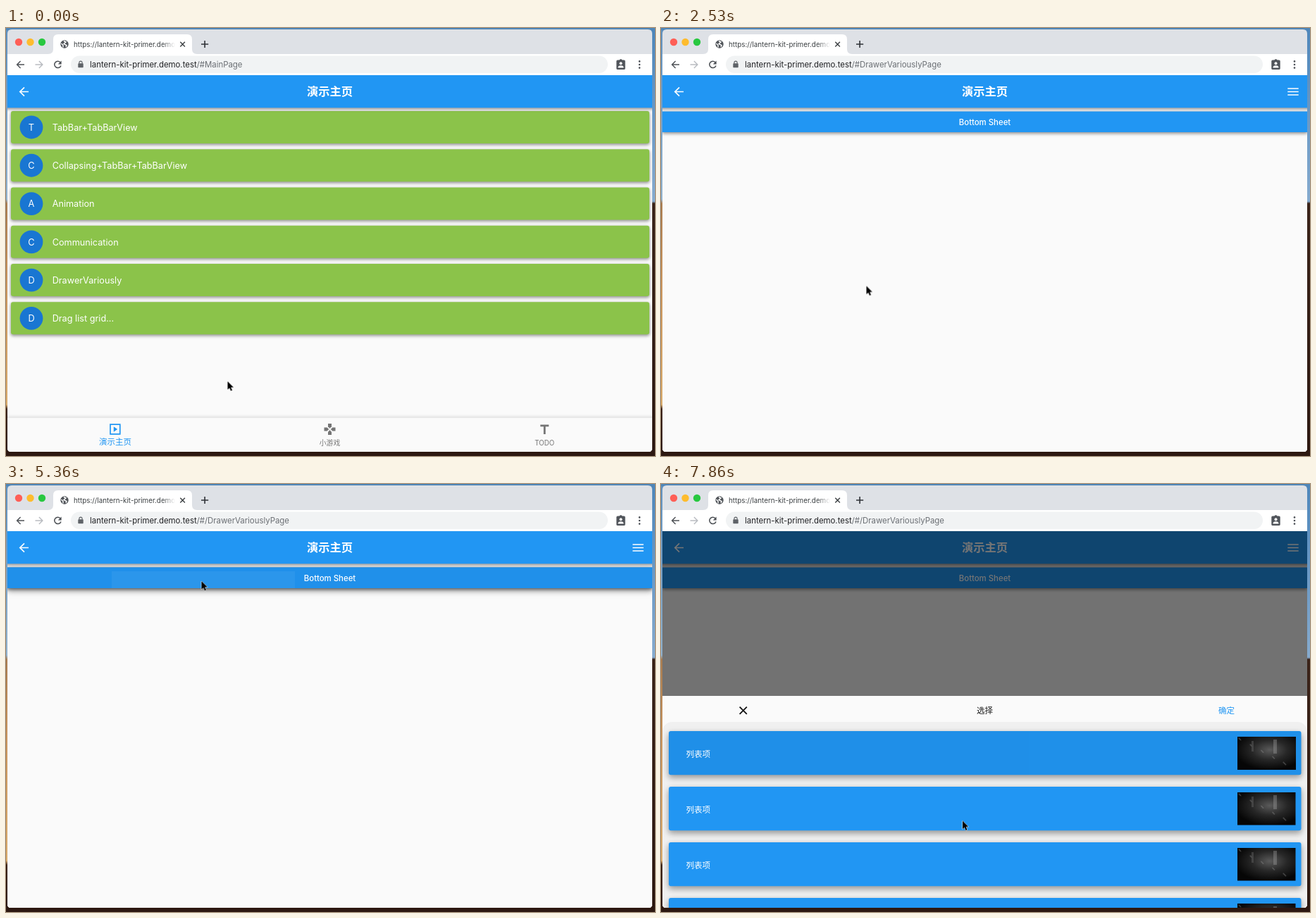
An HTML page for the animation above (8 s loop, 921 by 608 pixels).

```html
<!DOCTYPE html>
<html lang="zh-CN">
<head>
<meta charset="utf-8">
<title>Demo</title>
<style>
  html, body { margin: 0; width: 100%; height: 100%; overflow: hidden; }
  svg { display: block; width: 921px; height: 608px; }
  text { font-family: Inter, 'Noto Sans CJK SC', 'Noto Sans CJK', sans-serif; white-space: pre; }
  .mid { text-anchor: middle; }
  .line { fill: none; stroke-width: 1.6; }
  .bar { filter: drop-shadow(0 2.5px 2.3px rgba(0,0,0,.42)); }
  .card { filter: drop-shadow(0 2.5px 2px rgba(0,0,0,.33)) drop-shadow(0 1px 2px rgba(0,0,0,.14)); }
  .tile { filter: drop-shadow(0 4px 4px rgba(0,0,0,.3)) drop-shadow(0 2px 5px rgba(0,0,0,.1)); }
  .nav { filter: drop-shadow(0 -2.5px 1.5px rgba(0,0,0,.08)); }
</style>
</head>
<body>
<svg viewBox="0 0 921 608">
  <defs>
    <linearGradient id="leftEdge" x2="0" y2="1">
      <stop offset="0" stop-color="#5d8fbe"/><stop offset=".4" stop-color="#8fb0cc"/>
      <stop offset=".41" stop-color="#a97a4c"/><stop offset=".6" stop-color="#c9935a"/>
      <stop offset=".88" stop-color="#d8a968"/><stop offset=".89" stop-color="#3a2117"/>
      <stop offset="1" stop-color="#2a1711"/>
    </linearGradient>
    <linearGradient id="rightEdge" x2="0" y2="1">
      <stop offset="0" stop-color="#4d86bb"/><stop offset=".405" stop-color="#86abcf"/>
      <stop offset=".41" stop-color="#3a2319"/><stop offset="1" stop-color="#2b1710"/>
    </linearGradient>
    <linearGradient id="fade"><stop stop-color="#fff" stop-opacity="0"/><stop offset="1" stop-color="#fff"/></linearGradient>
    <radialGradient id="rain" cx=".55" cy=".4" r=".6">
      <stop stop-color="#5a5a5a"/><stop offset=".5" stop-color="#272727"/><stop offset="1" stop-color="#060606"/>
    </radialGradient>
    <clipPath id="app"><path d="M2 67H917V597Q917 602 912 602H7Q2 602 2 597Z"/></clipPath>
    <clipPath id="photo"><rect x="818" y="58" width="82.5" height="46.5"/></clipPath>
  </defs>

  <rect width="460" height="608" fill="url(#leftEdge)"/>
  <rect x="460" width="461" height="608" fill="url(#rightEdge)"/>
  <rect y="601" width="921" height="7" fill="#2d1811"/>
  <rect width="921" height="3" fill="#4f86b8"/>

  <g id="chrome">
    <path d="M2 37V8Q2 2 8 2H911Q917 2 917 8V37Z" fill="#dee1e6"/>
    <path d="M60 37Q67 37 67 30V16Q67 9 74 9H257Q264 9 264 16V30Q264 37 271 37H917V67.5H2V37Z" fill="#fff"/>
    <circle cx="18" cy="20" r="5.2" fill="#ff5f57"/>
    <circle cx="34.5" cy="20" r="5.2" fill="#febc2e"/>
    <circle cx="51" cy="20" r="5.2" fill="#28c840"/>
    <circle cx="83" cy="23" r="5.7" fill="#505459"/>
    <path d="M78.5 22L81 24.5V27.5M82 18.5L85 20L82 22.5L86 24.5L85 27" class="line" stroke="#fff" style="stroke-width:1.4"/>
    <text x="96" y="26.5" font-size="9.84" fill="#3c4043">https://lantern-kit-primer.demo</text>
    <rect x="222" y="14" width="18" height="18" fill="url(#fade)"/>
    <rect x="240" y="14" width="7" height="18" fill="#fff"/>
    <path d="M247.3 19.8L253.9 26.4M253.9 19.8L247.3 26.4" class="line" stroke="#3c4043" style="stroke-width:1.4"/>
    <path d="M277 23H287.2M282.1 18V28" class="line" stroke="#2f3237"/>
    <rect x="92" y="39.5" width="762" height="24.5" rx="12.2" fill="#f1f3f4"/>
    <path d="M26 52H15.8M20.6 47L15.6 52L20.6 57" class="line" stroke="#4d5156" style="stroke-width:1.4"/>
    <path d="M41.5 52H51.7M46.9 47L51.9 52L46.9 57" class="line" stroke="#b9bcc1" style="stroke-width:1.4"/>
    <path d="M77 48.7A4.7 4.7 0 1 0 78 53.4" class="line" stroke="#4d5156" style="stroke-width:1.5"/>
    <path d="M78.6 46.6V51.4H73.8Z" fill="#4d5156"/>
    <rect x="102.3" y="50.3" width="7.4" height="6" rx=".8" fill="#5f6368"/>
    <path d="M103.9 51V49.2A2.1 2.1 0 0 1 108.1 49.2V51" class="line" stroke="#5f6368" style="stroke-width:1.1"/>
    <path d="M868 45.5H870.5A2.2 2.2 0 0 1 874.5 45.5H877Q878.7 45.5 878.7 47V57.5Q878.7 59 877 59H868Q866.3 59 866.3 57.5V47Q866.3 45.5 868 45.5Z" fill="#50545a"/>
    <circle cx="872.5" cy="50.3" r="2" fill="#fff"/>
    <path d="M868.5 56.5Q868.5 53.3 872.5 53.3T876.5 56.5Z" fill="#fff"/>
    <g fill="#50545a"><circle cx="899" cy="47.4" r="1.3"/><circle cx="899" cy="52" r="1.3"/><circle cx="899" cy="56.6" r="1.3"/></g>
    <g id="urls"></g>
  </g>

  <g clip-path="url(#app)">
    <g id="home"></g>
    <g id="drawer"></g>
    <rect id="barrier" x="2" y="67" width="915" height="535"/>
    <g id="sheet"></g>
  </g>

  <path id="cursor" d="M0 0V11.8L2.7 9.3L4.5 13.5L6.5 12.7L4.7 8.6H8.4Z" fill="#000" stroke="#fff" stroke-width="1" paint-order="stroke" stroke-linejoin="round"/>
</svg>
<script>
const LOOP = 8000;
const BLUE = '#2196f3', PAPER = '#fafafa', GREY = '#757575';
const $ = id => document.getElementById(id);

const rect = (x, y, w, h, fill, extra = '') =>
  `<rect x="${x}" y="${y}" width="${w}" height="${h}" fill="${fill}" ${extra}/>`;
const text = (x, y, size, fill, label, extra = '') =>
  `<text x="${x}" y="${y}" font-size="${size}" fill="${fill}" ${extra}>${label}</text>`;
const mid = (x, y, size, fill, label, weight = 400) =>
  text(x, y, size, fill, label, `class="mid" font-weight="${weight}"`);
const line = (d, color, width = 1.7) =>
  `<path class="line" d="${d}" stroke="${color}" style="stroke-width:${width}"/>`;

const appBar = () =>
  rect(-8, 67, 935, 46.3, BLUE, 'class="bar"') +
  line('M32 90.5H20M26 84.3L19.8 90.5L26 96.7', '#fff') +
  mid(459.5, 96.2, 16.3, '#fff', '演示主页', 700);

const page = () => rect(2, 67, 915, 535, PAPER);

function homePage() {
  const items = ['TabBar+TabBarView', 'Collapsing+TabBar+TabBarView', 'Animation',
    'Communication', 'DrawerVariously', 'Drag list grid...'];
  const cards = items.map((label, i) => {
    const y = 118 + i * 54.27;
    return rect(7, y, 906, 46, '#8bc34a', 'rx="3" class="card"') +
      `<circle cx="36" cy="${y + 23}" r="16.4" fill="#1976d2"/>` +
      mid(36, y + 27.7, 12.8, '#fff', label[0]) +
      text(65.7, y + 27.7, 12.7, '#fff', label);
  }).join('');
  const nav = rect(-8, 554, 935, 60, PAPER, 'class="nav"') +
    line('M148 563.2H161.8V576.8H148Z', BLUE) +
    `<path d="M152.8 566.3V573.7L158.2 570Z" fill="${BLUE}"/>` +
    mid(155, 592.3, 11.5, BLUE, '演示主页') +
    ['0', '90', '180', '270'].map(a =>
      `<path d="M457 562H462V566.2L459.5 568.7L457 566.2Z" fill="${GREY}" transform="rotate(${a} 459.5 570)"/>`).join('') +
    mid(459.5, 593.2, 9.8, GREY, '小游戏') +
    `<path d="M758.3 563.5H770.3V566.2H765.7V577H762.9V566.2H758.3Z" fill="${GREY}"/>` +
    mid(764.2, 593.2, 9.8, GREY, 'TODO');
  return page() + cards + nav + appBar();
}

function drawerPage() {
  const button = extra => rect(2, 118.5, 915, 29.5, BLUE, extra);
  return page() + button('class="card"') +
    `<g id="buttonHover">${button('class="tile"')}${rect(2, 118.5, 915, 29.5, '#000', 'opacity=".04"')}</g>` +
    rect(150, 124, 260, 24, '#fff', 'id="ripple"') +
    mid(459.5, 137.6, 11.4, '#fff', 'Bottom Sheet', 500) + appBar() +
    line('M889.3 86H904.7M889.3 90.5H904.7M889.3 95H904.7', '#fff');
}

// Coordinates are relative to the top edge of the sheet.
function sheet() {
  const thumb = '<g clip-path="url(#photo)">' + rect(818, 58, 83, 47, 'url(#rain)') +
    '<g fill="#999" opacity=".35">' + rect(869, 62, 5, 20, '#aaa') + rect(838, 64, 3, 15, '#777') +
    Array.from({ length: 34 }, (_, k) =>
      `<circle cx="${820 + k * 31.7 % 79}" cy="${60 + k * 17.3 % 43}" r="${.5 + k % 3 * .25}"/>`).join('') + '</g></g>';
  const tiles = [0, 1, 2, 3].map(i => `<g transform="translate(0 ${i * 79})">` +
    rect(11, 50, 897.5, 62.3, BLUE, 'rx="3" class="tile"') +
    (i ? '' : rect(11, 50, 897.5, 62.3, '#000', 'rx="3" id="tileHover"')) +
    text(35.5, 87, 11.5, '#fff', '列表项', 'font-weight="500"') + thumb + '</g>').join('');
  return rect(2, 0, 915, 310, PAPER) +
    rect(2, 37, 915, 280, '#f0f0f0', 'rx="14"') +
    line('M111.6 15.6L121.8 25.8M121.8 15.6L111.6 25.8', '#111', 1.8) +
    mid(459.5, 24.8, 11.5, '#222', '选择', 500) +
    mid(802.5, 24.8, 11.5, BLUE, '确定') + tiles;
}

$('urls').innerHTML = ['/#MainPage', '/#DrawerVariouslyPage', '/#/DrawerVariouslyPage'].map((path, i) =>
  text(119, 55.7, 11.4, '#202124', `lantern-kit-primer.demo.test<tspan fill="#6b6f74">${path}</tspan>`, `id="url${i}"`)).join('');
$('home').innerHTML = homePage();
$('drawer').innerHTML = drawerPage();
$('sheet').innerHTML = sheet();

// Plays [time, ...values] rows as hard steps.
function hold(id, toStyle, rows) {
  const frames = rows.map(([time, ...values]) =>
    ({ offset: time / LOOP, easing: 'step-end', ...toStyle(...values) }));
  frames.push({ ...frames[frames.length - 1], offset: 1 });
  $(id).animate(frames, { duration: LOOP, iterations: Infinity });
}
const alpha = opacity => ({ opacity });
const move = (x, y) => ({ transform: `translate(${x}px, ${y}px)` });

hold('url0', alpha, [[0, 1], [2230, 0]]);
hold('url1', alpha, [[0, 0], [2230, 1], [5360, 0]]);
hold('url2', alpha, [[0, 0], [5360, 1]]);
hold('drawer', (y, opacity) => ({ ...move(0, y), opacity }),
  [[0, 134, 0], [2230, 92, .1], [2380, 4, .78], [2530, 0, 1]]);
hold('buttonHover', alpha, [[0, 0], [4030, 1], [6100, 0]]);
hold('ripple', alpha, [[0, 0], [5360, .05], [5510, .04], [5660, 0]]);
hold('barrier', alpha, [[0, 0], [5510, .5], [5660, .54]]);
hold('sheet', y => move(0, y), [[0, 640], [5510, 401.7], [5660, 301]]);
hold('tileHover', alpha, [[0, 0], [6530, .04]]);
hold('cursor', move, [
  [0, 314.5, 502], [300, 314, 501.5], [440, 314.5, 501],
  [890, 312, 484], [1040, 307, 455], [1190, 301, 424], [1330, 296, 396], [1480, 292.5, 374], [1630, 291.5, 366.5],
  [2980, 318, 312], [3130, 358, 222], [3280, 380, 166.5],
  [3730, 362, 160], [3880, 338, 152], [4030, 312, 146], [4170, 290, 144], [4320, 275, 146], [4460, 270.5, 146.5],
  [4760, 274, 142], [4910, 277.5, 138],
  [6100, 350, 290], [6240, 403.5, 408],
  [6680, 412, 440], [6820, 425, 478], [6970, 434, 493],
  [7270, 432, 455], [7420, 424, 397], [7560, 422, 430], [7710, 426, 465], [7860, 428, 478.5]
]);
</script>
</body>
</html>
```
